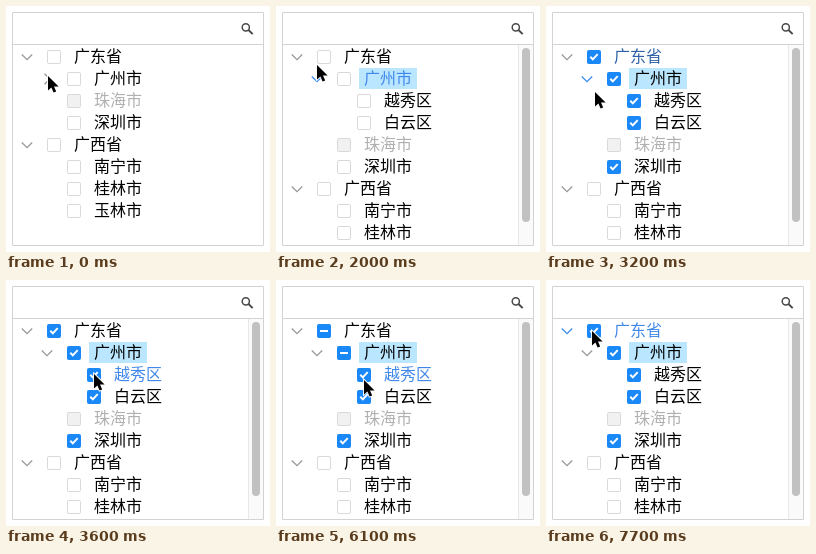
Animation, 264 px wide and 246 px high, one loop 8 s. Source, as an HTML page:

```html
<!DOCTYPE html>
<html lang="zh-CN">
<head>
<meta charset="utf-8">
<title>Tree select</title>
<style>
  html, body { margin: 0; width: 100%; height: 100%; overflow: hidden; background: #fff; }
  svg { display: block; width: 264px; height: 246px; }
  text { font: 16px "Noto Sans CJK SC", "Noto Sans CJK", "Noto Sans", sans-serif; }
  .frame { fill: none; stroke: #d3d3d3; }
  .chevron { fill: none; stroke-width: 1.3; }
  .box { fill: #fff; stroke: #d9d9d9; }
  .disabled .box { fill: #f1f1f1; }
  .mark { fill: none; stroke: #fff; stroke-width: 2; }
</style>
</head>
<body>
<svg viewBox="0 0 264 246">
  <defs>
    <clipPath id="view"><rect x="7" y="39" width="250" height="200"/></clipPath>
    <clipPath id="fold"><rect id="foldRect" x="7" y="83" width="250" height="0"/></clipPath>
  </defs>
  <g clip-path="url(#view)">
    <g id="top"></g>
    <g id="children" clip-path="url(#fold)"></g>
    <g id="rest"></g>
    <g id="bar">
      <rect x="242" y="39" width="15" height="200" fill="#fafafa"/>
      <path d="M242.5 39V239" stroke="#e8e8e8"/>
      <rect x="246" y="42" width="8" height="174" rx="4" fill="#c1c1c1"/>
    </g>
  </g>
  <path class="frame" d="M6.5 6.5H257.5V239.5H6.5ZM6.5 38.5H257.5"/>
  <g fill="none" stroke="#484848" stroke-width="1.5">
    <circle cx="239.8" cy="21.3" r="3.6"/>
    <path d="M242.5 24L246.7 28.2" stroke-width="1.9"/>
  </g>
  <path id="cursor" d="M0 0V14.5L3.4 11.4L5.6 16.6L8.2 15.5L6 10.4H10.6Z"
        stroke="#fff" stroke-width="1.8" paint-order="stroke"/>
</svg>
<script>
const LOOP = 8000, STEP = 100;
const BLUE = [64, 136, 234];
const $ = id => document.getElementById(id);
const clamp = v => Math.max(0, Math.min(1, v));

function add(parent, tag, attrs, text = "") {
  const el = document.createElementNS("http://www.w3.org/2000/svg", tag);
  for (const key in attrs) el.setAttribute(key, attrs[key]);
  el.textContent = text;
  return parent.appendChild(el);
}

// checks: [time, state]; hovers: [from, to]
const rows = [
  { name: "广东省", level: 0, y: 50, group: "top", arrow: true,
    checks: [[2700, "on"], [3900, "half"], [7200, "on"]], hovers: [[2100, 3100], [6700, LOOP]] },
  { name: "广州市", level: 1, y: 72, group: "top", arrow: true,
    checks: [[2700, "on"], [3900, "half"], [7200, "on"]],
    hovers: [[1000, 2100], [3200, 3300], [6500, 6700]] },
  { name: "越秀区", level: 2, y: 94, group: "children",
    checks: [[2700, "on"], [3900, "off"], [5300, "on"]], hovers: [[3300, 6500]] },
  { name: "白云区", level: 2, y: 116, group: "children", checks: [[2700, "on"]] },
  { name: "珠海市", level: 1, y: 94, group: "rest", disabled: true },
  { name: "深圳市", level: 1, y: 116, group: "rest", checks: [[2700, "on"]] },
  { name: "广西省", level: 0, y: 138, group: "rest", arrow: true },
  { name: "南宁市", level: 1, y: 160, group: "rest" },
  { name: "桂林市", level: 1, y: 182, group: "rest" },
  { name: "玉林市", level: 1, y: 204, group: "rest" }
];

function build(row) {
  const x = 41 + row.level * 20;
  const g = add($(row.group), "g", {
    transform: `translate(${x} ${row.y})`, class: row.disabled ? "disabled" : ""
  });
  if (row.name === "广州市")
    row.back = add(g, "rect", { x: 22, y: -10, width: 58, height: 21, fill: "#bae7ff" });
  if (row.arrow)
    row.chevron = add(g, "path", { class: "chevron", d: "M-5.2 -2.5L0 2.7L5.2 -2.5" });
  add(g, "rect", { class: "box", x: .5, y: -5.5, width: 13, height: 13, rx: 1.5 });
  row.fill = add(g, "rect", { y: -6, width: 14, height: 14, rx: 2, fill: "#1b88f7" });
  row.on = add(g, "path", { class: "mark", d: "M-3.7 -.2L-1.2 2.4L3.7 -2.9" });
  row.half = add(g, "path", { class: "mark", d: "M-4 0H4" });
  row.label = add(g, "text", { x: 27, y: 6 }, row.name);
}

const hovered = (row, t) => (row.hovers || []).some(([a, b]) => t >= a && t < b);

function hoverAmount(row, t) {
  let v = 0;
  for (let s = 0; s < t; s += STEP) v = clamp(v + (hovered(row, s) ? .5 : -.5));
  return Math.sin(v * Math.PI / 2);
}

function drawCheck(row, t) {
  let from = "off", to = "off", start = -LOOP;
  for (const [time, state] of row.checks || [])
    if (t >= time) [from, to, start] = [to, state, time];
  const p = clamp((t - start + STEP) / 300);
  const amount = (s) => (to === s ? p : 0) + (from === s ? 1 - p : 0);
  row.fill.setAttribute("opacity", 1 - amount("off"));
  for (const s of ["on", "half"]) {
    const k = amount(s);
    row[s].setAttribute("opacity", k);
    row[s].setAttribute("transform", `translate(7 1) scale(${k})`);
  }
}

function drawRow(row, t, open) {
  const v = hoverAmount(row, t);
  const color = row.disabled ? "#b0b0b0" : `rgb(${BLUE.map(c => Math.round(c * v))})`;
  row.label.style.fill = color;
  row.label.style.fontWeight = row.disabled || v > .5 ? 500 : 400;
  if (row.chevron) {
    const turn = row.back ? -90 * (1 - open) : 0;
    row.chevron.setAttribute("transform", `translate(-20 1) rotate(${turn})`);
    row.chevron.setAttribute("stroke", hovered(row, t) ? "#3a8ef0" : "#999");
  }
  if (row.back) row.back.setAttribute("opacity", open);
  drawCheck(row, t);
}

const path = [
  [0, 42, 70], [300, 42, 70], [500, 44, 72], [1700, 44, 72], [2000, 41, 59],
  [2300, 46, 51], [2900, 46, 51], [3000, 46, 56], [3200, 49, 86], [3500, 86, 94],
  [3600, 88, 94], [4600, 88, 94], [4800, 90, 95], [4900, 90, 95], [5000, 88, 100],
  [6300, 88, 100], [6500, 76, 80], [6700, 54, 58], [7000, 46, 50],
  [7600, 46, 50], [7700, 46, 51], [LOOP, 46, 51]
];

function cursorAt(t) {
  const i = path.findIndex(p => p[0] > t);
  const [t0, x0, y0] = path[i - 1], [t1, x1, y1] = path[i];
  const k = (t - t0) / (t1 - t0);
  return [x0 + (x1 - x0) * k, y0 + (y1 - y0) * k];
}

function draw(t) {
  const p = clamp((t - 1300) / 300);
  const open = p * p * (3 - 2 * p);
  $("foldRect").setAttribute("height", 44 * open);
  $("children").setAttribute("opacity", open);
  $("rest").setAttribute("transform", `translate(0 ${44 * open})`);
  $("bar").setAttribute("visibility", open > 0 ? "visible" : "hidden");
  rows.forEach(row => drawRow(row, t, open));
  $("cursor").setAttribute("transform", `translate(${cursorAt(t)})`);
}

rows.forEach(build);
const began = performance.now();
function tick() {
  const t = (performance.now() - began) % LOOP;
  draw(Math.floor(t / STEP) * STEP);
  requestAnimationFrame(tick);
}
tick();
</script>
</body>
</html>
```
